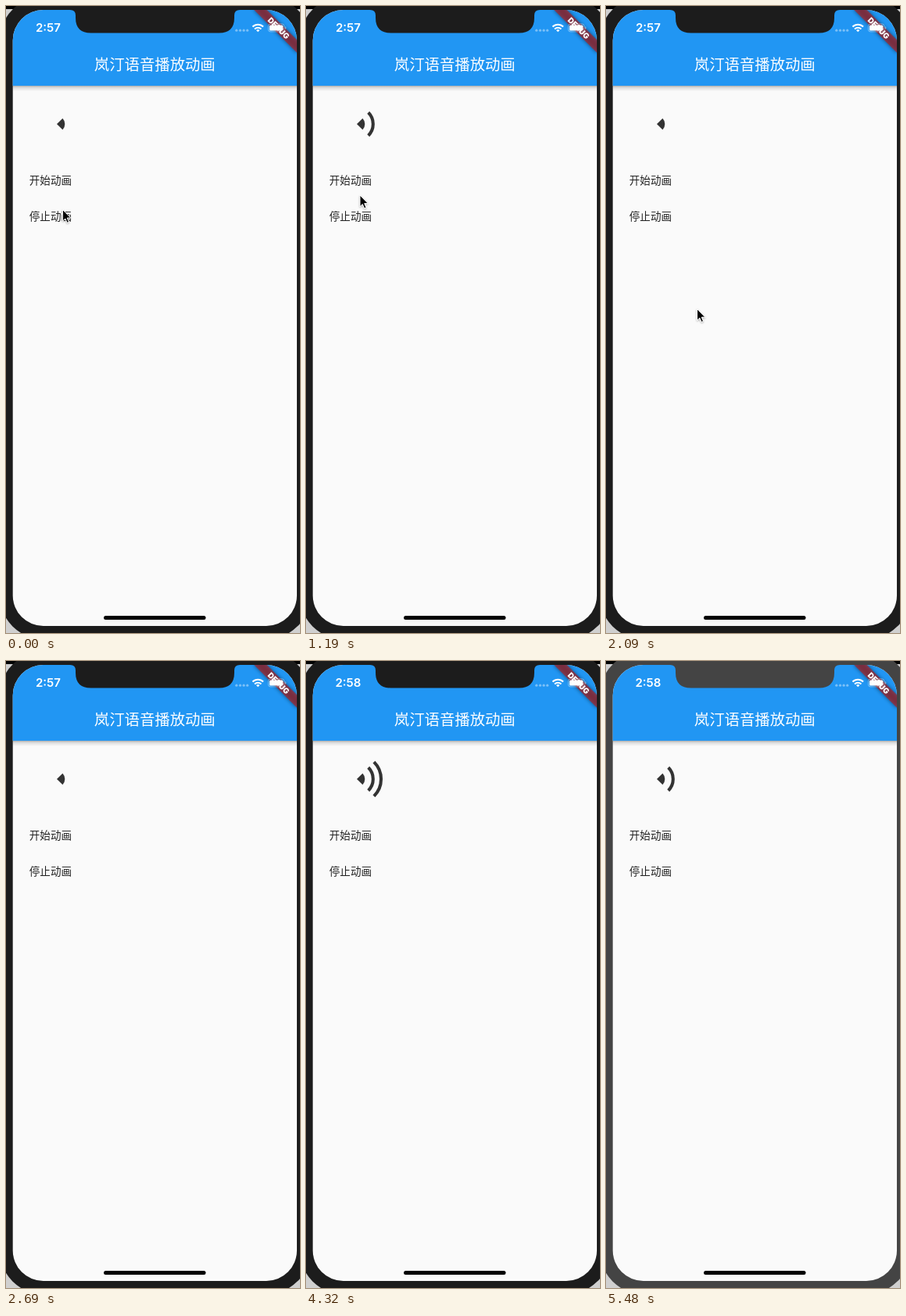
Write an HTML page that moves like this. It is 376x802 px and loops after 5580 ms.

```html
<!DOCTYPE html>
<html lang="zh-CN">
<head>
<meta charset="utf-8">
<title>语音播放动画</title>
<style>
html, body { margin: 0; width: 100%; height: 100%; overflow: hidden; background: #c9c9c9; }
svg { display: block; width: 376px; height: 802px; }
text { font-family: "Noto Sans CJK SC", "Noto Sans CJK", "Noto Sans", sans-serif; font-weight: 500; }
.latin { font-family: Inter, Roboto, sans-serif; fill: #fff; text-anchor: middle; }
</style>
</head>
<body>
<svg viewBox="0 0 376 802" xmlns="http://www.w3.org/2000/svg">
  <defs>
    <clipPath id="screen"><rect x="8.7" y="5" width="363.3" height="788" rx="39"/></clipPath>
    <linearGradient id="shade" x2="0" y2="1">
      <stop offset="0" stop-opacity=".3"/>
      <stop offset=".35" stop-opacity=".12"/>
      <stop offset="1" stop-opacity="0"/>
    </linearGradient>
    <filter id="blur" x="-20%" y="-80%" width="140%" height="260%"><feGaussianBlur stdDeviation="2.6"/></filter>
    <filter id="drop" x="-50%" y="-50%" width="200%" height="200%">
      <feDropShadow dx="0" dy="1" stdDeviation="1" flood-opacity=".35"/>
    </filter>
  </defs>

  <rect width="376" height="802" fill="#d0d0d0"/>
  <rect width="376" height="4" fill="#000"/>
  <rect id="bezel" x="-8" y="-12" width="397" height="822" rx="56"/>

  <g clip-path="url(#screen)">
    <rect width="376" height="802" fill="#fafafa"/>
    <rect y="102" width="376" height="7" fill="url(#shade)"/>
    <rect width="376" height="102" fill="#2196f3"/>
    <text x="190.3" y="82.2" font-size="19.36" fill="#fff" text-anchor="middle">岚汀语音播放动画</text>
    <text x="29.8" y="228" font-size="13.55" fill="#212121">开始动画</text>
    <text x="29.8" y="274.2" font-size="13.55" fill="#212121">停止动画</text>

    <g transform="translate(372 5) rotate(45) scale(.968)">
      <rect x="-40" y="28" width="80" height="12" opacity=".5" filter="url(#blur)"/>
      <rect x="-40" y="28" width="80" height="12" fill="#b71c1c" fill-opacity=".627"/>
      <text class="latin" y="37.7" font-size="10.2" style="font-weight:900">DEBUG</text>
    </g>

    <text class="latin" id="clock" x="53.9" y="33.2" font-size="15" style="font-weight:600"></text>
    <g fill="#fff" fill-opacity=".4">
      <circle cx="294.8" cy="31.2" r="1.6"/><circle cx="299.5" cy="31.2" r="1.6"/>
      <circle cx="304.1" cy="31.2" r="1.6"/><circle cx="308.7" cy="31.2" r="1.6"/>
    </g>
    <g fill="none" stroke="#fff" stroke-width="2.1">
      <path d="M315.4 26.6a9.6 9.6 0 0 1 13.6 0"/>
      <path d="M318 29.4a6 6 0 0 1 8.4 0"/>
      <path d="M320 31.1a3.2 3.2 0 0 1 4.4 0L322.2 33.3z" fill="#fff" stroke="none"/>
    </g>
    <rect x="335.4" y="22.9" width="20.4" height="10" rx="2.8" fill="none" stroke="#fff" stroke-opacity=".4"/>
    <rect x="336.9" y="24.4" width="17.4" height="7" rx="1.5" fill="#fff"/>
    <path d="M357 26v4q1.4-.6 1.4-2t-1.4-2z" fill="#fff" fill-opacity=".45"/>

    <g fill="none" stroke="#333" stroke-width="4.1">
      <path d="M65 151l7.4-7.2a10.3 10.3 0 0 1 0 14.4z" fill="#333" stroke="none"/>
      <path class="wave"/>
      <path class="wave"/>
    </g>
    <rect x="125" y="780" width="130.5" height="5" rx="2.5"/>
  </g>

  <path id="notch" d="M82 0V5Q89 5 89 12V15Q89 34.5 108.5 34.5H272.5Q292 34.5 292 15V12Q292 5 299 5V0z"/>
  <path id="cursor" d="M0 0V14.6L3.3 11.5L5.6 16.8L8 15.8L5.7 10.6H10.3z" stroke="#fff" stroke-width="1" filter="url(#drop)"/>
</svg>
<script>
const LOOP = 5580, STEP = 150, BEAT = 205;
const $ = id => document.getElementById(id);
const waves = document.querySelectorAll('.wave');

// Pointer stops: time, x, y
const route = [
  [0, 72.5, 260.5], [140, 64, 262], [440, 36, 265], [590, 37, 267],
  [1040, 68, 269.5], [1190, 69, 242], [1340, 66, 228], [1490, 64, 222],
  [1640, 64, 222], [1790, 70, 246], [1940, 92, 312], [2090, 116.5, 387.5],
  [2240, 133, 450], [2390, 144, 508], [2540, 149, 549]
];

waves.forEach((w, i) => {
  const r = i ? 31 : 20.8, d = r * Math.SQRT1_2;
  w.setAttribute('d', `M${65 + d} ${151 - d}A${r} ${r} 0 0 1 ${65 + d} ${151 + d}`);
});

function snap(t) {
  const start = [5210, 2970, 140].find(s => t >= s);
  return start === undefined ? 0 : start + STEP * Math.floor((t - start) / STEP);
}

function pointer(t) {
  const i = route.findIndex(p => p[0] > t);
  if (i < 0) return route[route.length - 1].slice(1);
  const a = route[i - 1], b = route[i], k = (t - a[0]) / (b[0] - a[0]);
  return [a[1] + (b[1] - a[1]) * k, a[2] + (b[2] - a[2]) * k];
}

// Number of waves: plays, is stopped on one wave, then plays again
function level(t) {
  if (t < 950) return Math.floor((t + 65) / BEAT) % 3;
  if (t < 1825) return 1;
  return (2 + Math.floor((t - 1825) / BEAT)) % 3;
}

function draw(time) {
  const t = snap(time), n = level(t), [x, y] = pointer(t);
  waves.forEach((w, i) => w.style.display = i < n ? '' : 'none');
  $('cursor').setAttribute('transform', `translate(${x} ${y})`);
  $('cursor').style.display = t < 2690 ? '' : 'none';
  $('clock').textContent = t < 3570 ? '2:57' : '2:58';
  const shell = time < 5480 ? '#1c1c1c' : '#444';
  $('bezel').setAttribute('fill', shell);
  $('notch').setAttribute('fill', shell);
}

const begin = performance.now();
function tick() {
  draw((performance.now() - begin) % LOOP);
  requestAnimationFrame(tick);
}
tick();
</script>
</body>
</html>
```
